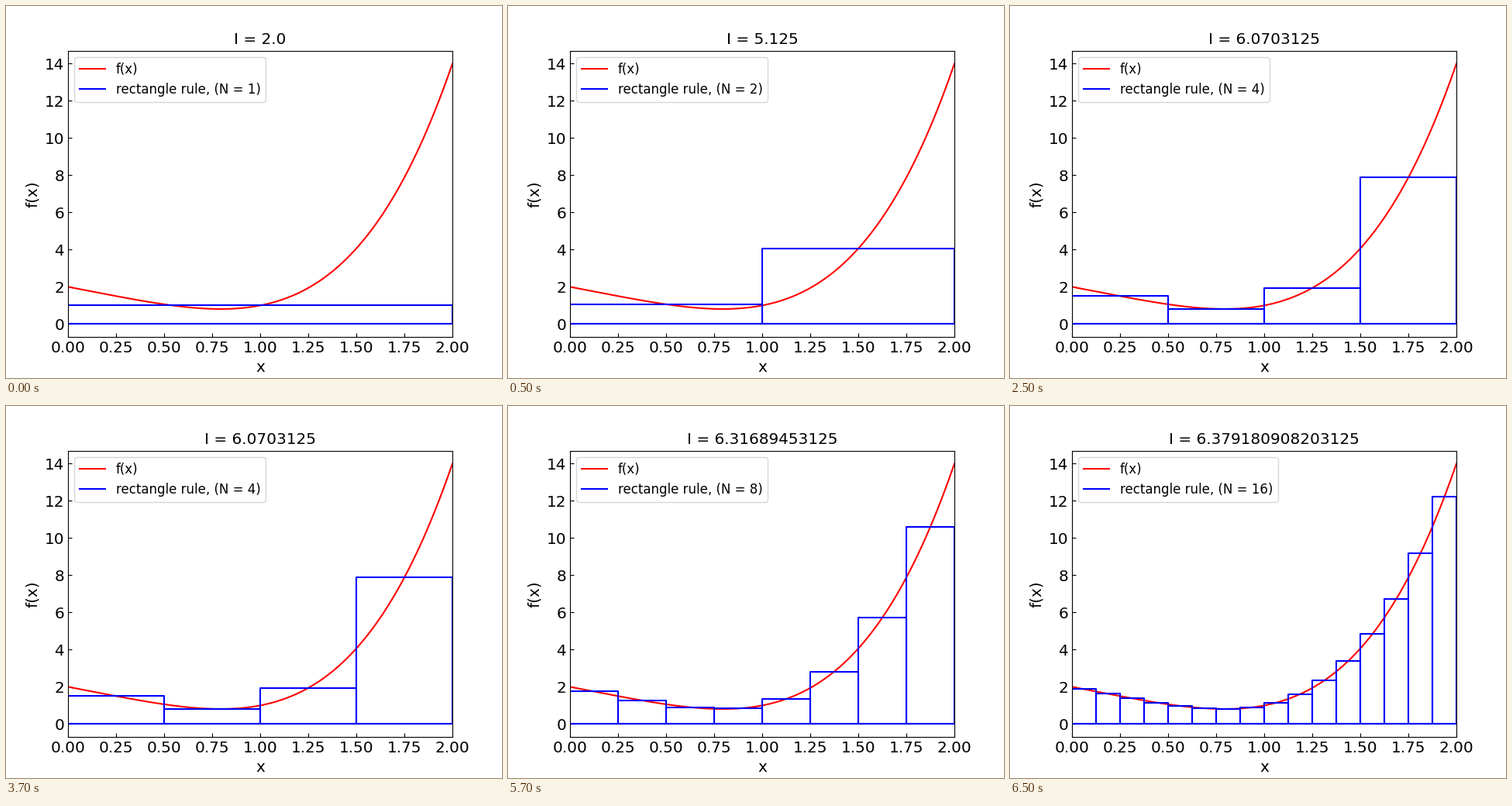
These frames come from a looping animation (640x480 px, 8 s). A matplotlib script:

```python
import numpy as np
import matplotlib.pyplot as plt
from matplotlib.animation import FuncAnimation

plt.rcParams.update({
    "font.family": "DejaVu Sans",
    "font.size": 12,
    "axes.titlesize": "large",
    "axes.labelsize": "large",
    "xtick.labelsize": "large",
    "ytick.labelsize": "large",
    "legend.fontsize": "medium",
    "xtick.direction": "in",
    "ytick.direction": "in",
})

A, B = 0.0, 2.0
INTERVAL = 500
FRAMES = 16


def f(x):
    return x**4 - 2 * x + 2


def midpoint_rule(n):
    """Return the integral estimate and the outline of its n rectangles."""
    h = (B - A) / n
    left = A + h * np.arange(n)
    right = left + h
    height = f(left + h / 2)
    zero = np.zeros(n)
    xs = np.column_stack([left, left, right, right, left, right]).ravel()
    ys = np.column_stack([zero, height, height, zero, zero, zero]).ravel()
    return float(h * height.sum()), xs, ys


fig, ax = plt.subplots(figsize=(6.4, 4.8), dpi=100)
x = np.linspace(A, B, 200)
ax.plot(x, f(x), color="red", label="f(x)")
outline, = ax.plot([], [], color="blue", label="rectangle rule")
ax.set(xlim=(A, B), ylim=(-0.7, 14.7), xlabel="x", ylabel="f(x)")


def update(frame):
    # The rectangle count doubles every four steps, first after one step.
    n = 2 ** ((frame + 3) // 4)
    integral, xs, ys = midpoint_rule(n)
    outline.set_data(xs, ys)
    outline.set_label(f"rectangle rule, (N = {n})")
    ax.set_title(f"I = {integral}")
    ax.legend(loc="upper left")
    return []


anim = FuncAnimation(fig, update, frames=FRAMES, interval=INTERVAL,
                     init_func=lambda: update(0), repeat=True, repeat_delay=0)
plt.show()
```
